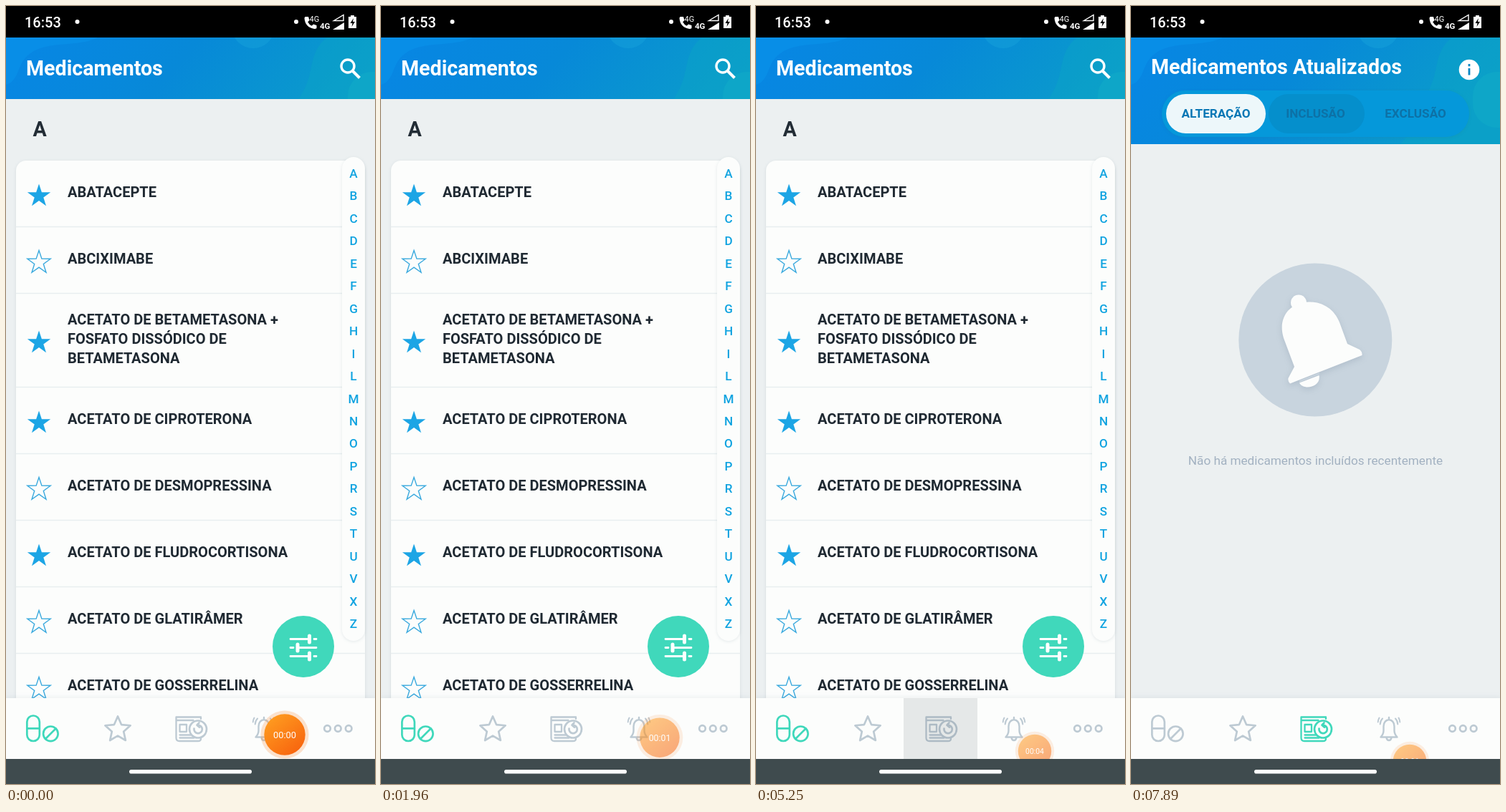
An HTML page that plays this animation: 515 px wide and 1087 px high, repeating every 7990 ms.

```html
<!DOCTYPE html>
<html lang="pt-BR">
<head>
<meta charset="utf-8">
<title>Medicamentos</title>
<style>
html, body { margin: 0; width: 100%; height: 100%; overflow: hidden; background: #000; }
svg { display: block; width: 100%; height: 100%; font-family: Roboto, sans-serif; }
.title { font-size: 28.6px; font-weight: 700; fill: #fff; }
.item { font-size: 20.03px; font-weight: 700; fill: #1f2932; }
.letter { font-size: 17.2px; font-weight: 500; fill: #0fa3e0; }
.tab { font-size: 17.17px; font-weight: 700; fill: #0d71a6; }
.mid { text-anchor: middle; }
.icon { fill: none; stroke: currentColor; stroke-width: 2.7; stroke-linecap: round; stroke-linejoin: round; color: #bdcad3; }
.icon.on { color: #3fd8bb; }
.soft { filter: drop-shadow(0 1px 2px rgba(60, 90, 110, .12)); }
</style>
</head>
<body>
<svg viewBox="0 0 515 1087" preserveAspectRatio="none">
  <defs>
    <linearGradient id="sky" x1="0" y1="0" x2="1" y2=".25">
      <stop offset="0" stop-color="#0786e5"/><stop offset=".5" stop-color="#0789d8"/><stop offset="1" stop-color="#0b9ccb"/>
    </linearGradient>
    <linearGradient id="orange" x1=".1" y1="0" x2=".9" y2="1">
      <stop offset="0" stop-color="#ffa021"/><stop offset="1" stop-color="#f7600d"/>
    </linearGradient>
    <clipPath id="header"><rect id="headerClip" y="44" width="515" height="86"/></clipPath>
    <clipPath id="content"><rect y="130" width="515" height="837"/></clipPath>
    <clipPath id="aboveBar"><rect width="515" height="1052"/></clipPath>
    <clipPath id="cell"><rect x="206" y="967" width="103" height="85"/></clipPath>
  </defs>

  <rect width="515" height="1087" fill="#ecf0f1"/>
  <rect width="515" height="45"/>

  <!-- status bar -->
  <g fill="#fff">
    <text x="26" y="30" font-size="20" font-weight="500">16:53</text>
    <circle cx="99.5" cy="22" r="3"/><circle cx="405" cy="22" r="3"/>
    <path d="M418 15h4l1.5 5-2.3 2.2q2 4 5.500 5.500l2.300-2.200 4.500 1.500v4q-1 1-3 1-13-2-14-15 .3-1.800 1.500-2z"/>
    <text x="423.500" y="22" font-size="11">4G</text>
    <text x="438" y="32" font-size="11.500" font-weight="700">4G</text>
    <path d="M456 33 472 23v10z"/>
    <path d="M457.500 20.500 471 12.500v8z" fill="none" stroke="#fff" stroke-width="1.400"/>
    <path d="M481 13h5v2h3v16h-11V15h3z"/>
    <path d="m485 17-4.500 7h3l-1 5 4.500-7h-3z" fill="#000"/>
  </g>

  <g clip-path="url(#header)">
    <rect y="44" width="515" height="149" fill="url(#sky)"/>
    <path d="M0 44H128C100 58 58 48 34 66 14 80 20 104 0 110z" fill="#0a93ea" opacity=".65"/>
    <circle cx="345" cy="29" r="30" fill="#16a2dc" opacity=".5"/>
    <path d="M448 44C420 66 432 94 412 124 400 146 398 170 376 193H515V44z" fill="#0aa5c4" opacity=".4"/>
    <rect x="477" y="92" width="80" height="78" rx="34" fill="#13aec9" opacity=".4"/>
  </g>

  <g id="listPage">
    <text class="title" x="28" y="97">Medicamentos</text>
    <g fill="none" stroke="#fff" stroke-width="3.400"><circle cx="477" cy="84" r="9"/><path d="m483.500 90.500 10 10" stroke-width="4"/></g>
    <text x="37.500" y="182" font-size="28.600" font-weight="700" fill="#222c35">A</text>
    <g clip-path="url(#content)">
      <rect class="soft" x="14" y="216" width="487" height="800" rx="14" fill="#fcfdfc"/>
      <g id="rows"></g>
    </g>
    <rect class="soft" x="469" y="211" width="32" height="676" rx="16" fill="#fcfdfc"/>
    <g id="letters"></g>
    <circle cx="415" cy="895" r="43" fill="#40d8bb"/>
    <g stroke="#fff" stroke-width="2.800" stroke-linecap="round">
      <path d="M397 884.500h20M430 884.500h3M397 896.500h4M413 896.500h20M397 908.500h20M430 908.500h3"/>
      <path d="M423.500 880v9M407 892v9M423.500 904v9" stroke-width="5"/>
      <path d="M418 884.500h5M408 896.500h5M418 908.500h5"/>
    </g>
  </g>

  <g id="newsPage">
    <text class="title" x="28" y="95">Medicamentos Atualizados</text>
    <circle cx="472" cy="89" r="14.300" fill="#fff"/>
    <path d="M472 87v9.500M472 81v3.200" stroke="#0a86c4" stroke-width="2.800"/>
    <rect class="soft" x="43" y="118" width="429" height="65" rx="32.500" fill="#0598da"/>
    <rect id="activeTab" x="49" y="123" width="139" height="55" rx="27.500" fill="#fcfdfc"/>
    <rect id="tabShade" x="192" y="123" width="134" height="55" rx="27.500" fill="#103c50"/>
    <g class="mid">
      <text class="tab" x="118.500" y="156" style="fill:#0877b5">ALTERAÇÃO</text>
      <text class="tab" x="257.500" y="156">INCLUSÃO</text>
      <text class="tab" x="397" y="156">EXCLUSÃO</text>
      <text id="message" x="257.500" y="641" font-size="17.170" fill="#a2b1c1"></text>
    </g>
    <circle cx="257.300" cy="466.500" r="107" fill="#c8d4de"/>
    <g fill="#fcfdfc" style="filter:drop-shadow(0 3px 4px rgba(70,95,120,.18))">
      <path d="M235 526.500C241 538 266 532 262.500 516z"/>
      <circle cx="234" cy="414.500" r="11"/>
      <path d="M228 504 213 464C204 435 222 414 248 413.500 268 413 284 424 291 442L302 472 319 480Q323 483 322.500 488L222 527.500Q218.500 524 219.500 520z"/>
    </g>
    <path d="m235 524.500 28-11" stroke="#c8d4de" stroke-width="2"/>
  </g>

  <!-- bottom navigation -->
  <rect y="967" width="515" height="85" fill="#fcfdfc" style="filter:drop-shadow(0 -2px 3px rgba(60,90,110,.07))"/>
  <g id="pillIcon" class="icon">
    <rect x="29.300" y="991.500" width="17.500" height="35.500" rx="8.700"/>
    <path d="M29.300 1009.300h17.500M55 1024l14.500-14.500"/><circle cx="62.300" cy="1016.800" r="10.300"/>
  </g>
  <path id="navStar" class="icon"/>
  <g id="newsIcon" class="icon" stroke-width="2.500">
    <path d="M272 996v-2.500h-34.500v29q0 4.500 4.500 4.500h26q4 0 4-3M237.500 998h24M242.500 1004h9.500v10h-9.500zM242.500 1018.500h16M242.500 1022.500h20" stroke-width="2.300"/>
    <circle cx="268" cy="1010.500" r="12"/>
    <path d="M262.500 1009.500a5.700 5.700 0 1 0 5.500-4.700M269.500 1001.500l-3 3.200 3.500 3"/>
  </g>
  <g class="icon">
    <path d="M348.500 1021.500h23q-4-4-4-9v-6q0-8-7.500-9.500-7.500 1.500-7.500 9.500v6q0 5-4 9zM360 996.500v-2.500M356.500 1022q.5 4 3.500 4t3.500-4" stroke-width="2.400"/>
    <path d="M351 995.500q-3 3-3.300 8M346.500 994.500q-1.500 2.500-1.800 6M369 995.500q3 3 3.300 8M373.500 994.500q1.500 2.500 1.800 6" stroke-width="2"/>
  </g>
  <g class="icon"><circle cx="448.500" cy="1009.500" r="4.300"/><circle cx="463.300" cy="1009.500" r="4.300"/><circle cx="478.200" cy="1009.500" r="4.300"/></g>
  <circle id="navRipple" cx="257.500" cy="1010" fill="#1f3640" clip-path="url(#cell)"/>

  <g clip-path="url(#aboveBar)">
    <g id="bubble">
      <circle r="33.500" fill="#f58a3c" opacity=".25"/>
      <circle r="28.700" fill="url(#orange)"/>
      <text id="clock" class="mid" y="4.800" font-size="12.800" fill="#fff"></text>
    </g>
  </g>
  <rect y="1052" width="515" height="35" fill="#3f4b4e"/>
  <rect x="172" y="1067" width="171" height="5.600" rx="2.800" fill="#fff"/>
</svg>

<script>
const LOOP = 7990;
const PAGE_SWITCH = 5720;
const TICKS = [1900, 2950, 3970, 5200, 6240, 7270];

const ROWS = [
  [["ABATACEPTE"], true],
  [["ABCIXIMABE"], false],
  [["ACETATO DE BETAMETASONA +", "FOSFATO DISSÓDICO DE", "BETAMETASONA"], true],
  [["ACETATO DE CIPROTERONA"], true],
  [["ACETATO DE DESMOPRESSINA"], false],
  [["ACETATO DE FLUDROCORTISONA"], true],
  [["ACETATO DE GLATIRÂMER"], false],
  [["ACETATO DE GOSSERRELINA"], false],
];

const $ = id => document.getElementById(id);
const set = (id, attrs) => {
  for (const name in attrs) $(id).setAttribute(name, attrs[name]);
};
const ramp = (t, from, to) => Math.min(1, Math.max(0, (t - from) / (to - from)));
const show = (id, visible) => { $(id).style.display = visible ? "" : "none"; };

function starPath(cx, cy, outer, inner) {
  const points = Array.from({ length: 10 }, (_, i) => {
    const r = i % 2 ? inner : outer, a = (i / 5 - 0.5) * Math.PI;
    return `${(cx + r * Math.cos(a)).toFixed(2)} ${(cy + r * Math.sin(a)).toFixed(2)}`;
  });
  return `M${points.join("L")}z`;
}

function buildList() {
  let y = 216, html = "";
  for (const [lines, starred] of ROWS) {
    const tall = lines.length > 1;
    const height = tall ? 131 : 93;
    if (y > 216) html += `<path d="M14 ${y - 0.5}H501" stroke="#e8eef0" stroke-width="1.4"/>`;
    const star = starPath(46, y + (tall ? 68.5 : 49.5), 17, 6.6);
    html += `<path d="${star}" ${starred ? 'fill="#1ca5e5"' : 'fill="none" stroke="#39a9de" stroke-width="1.4"'}/>`;
    lines.forEach((line, i) => {
      html += `<text class="item" x="86" y="${y + (tall ? 43 : 51) + i * 27}">${line}</text>`;
    });
    y += height;
  }
  $("rows").innerHTML = html;
  $("letters").innerHTML = [..."ABCDEFGHILMNOPRSTUVXZ"].map((c, i) =>
    `<text class="letter mid" x="485" y="${240 + i * 31.45}">${c}</text>`).join("");
  set("navStar", { d: starPath(156, 1011, 18.5, 8.6) });
}

function draw(t) {
  const news = t >= PAGE_SWITCH;
  show("listPage", !news);
  show("newsPage", news);
  set("headerClip", { height: news ? 149 : 86 });
  $("pillIcon").classList.toggle("on", !news);
  $("newsIcon").classList.toggle("on", news);

  set("navRipple", {
    r: 20 + 48 * ramp(t, 4960, 5180),
    opacity: 0.1 * ramp(t, 4960, 5060) * (1 - ramp(t, 5290, 5420)),
  });

  const kind = t < 7800 ? "alterados" : "incluídos";
  $("message").textContent = `Não há medicamentos ${kind} recentemente`;
  set("tabShade", { opacity: 0.1 * ramp(t, 7540, 7800) });
  set("activeTab", { opacity: 1 - 0.06 * ramp(t, 7800, 7890) });

  // The recorder bubble fades and shrinks, then later sinks behind the bar.
  const shrink = ramp(t, 1820, 2590);
  const y = 1018 + 23 * shrink + 14 * ramp(t, 7540, 7890);
  set("bubble", {
    transform: `translate(389 ${y}) scale(${1 - 0.19 * shrink})`,
    opacity: 1 - 0.45 * ramp(t, 1820, 1950),
  });
  $("clock").textContent = "00:0" + TICKS.filter(tick => t >= tick).length;
}

buildList();
const start = performance.now();
function frame() {
  draw((performance.now() - start) % LOOP);
  requestAnimationFrame(frame);
}
frame();
</script>
</body>
</html>
```
